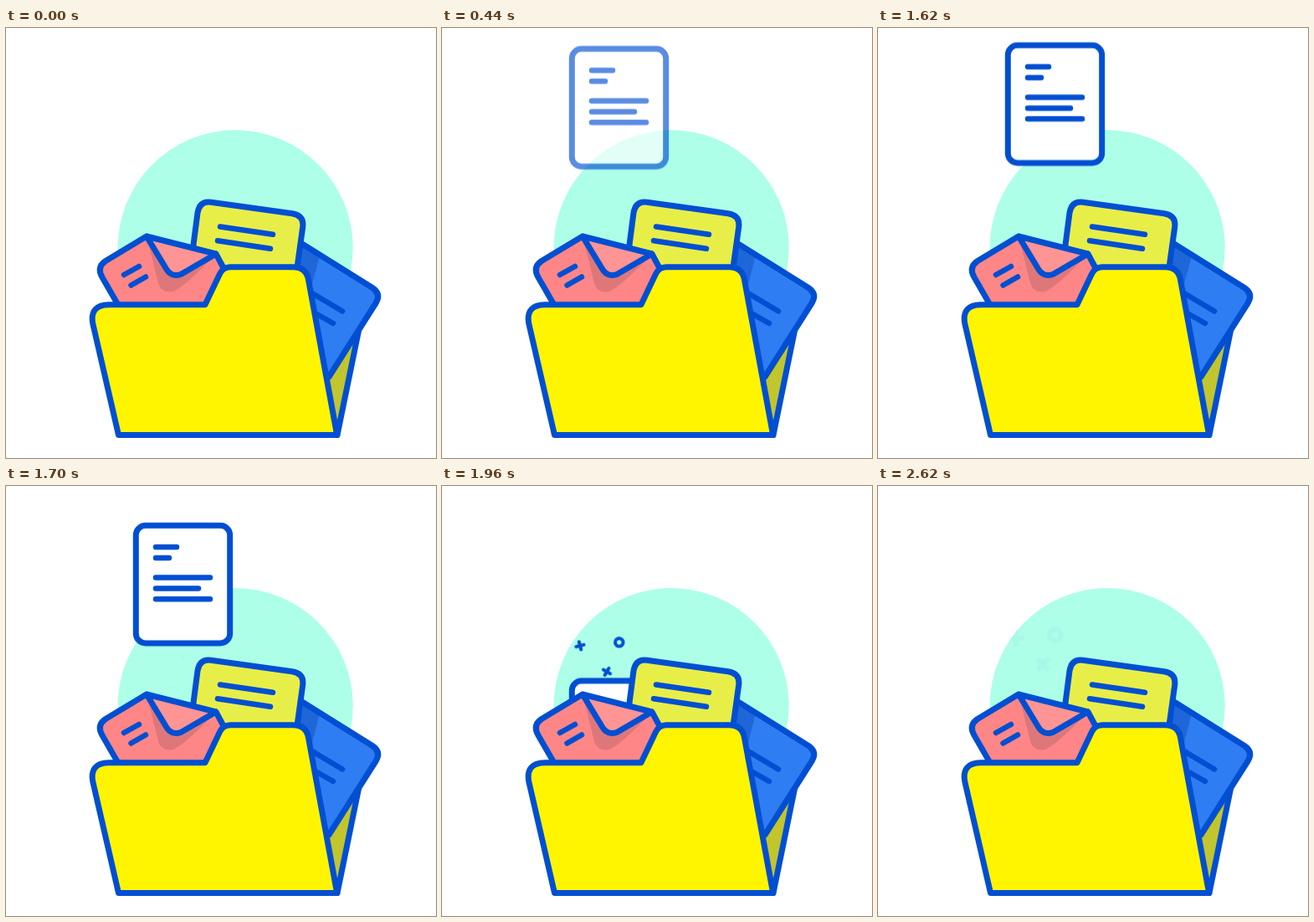
An HTML page without scripts that plays this animation: 514x514 px, repeating every 4800 ms.

```html
<!DOCTYPE html>
<html lang="en">
<head>
<meta charset="utf-8">
<title>Filing a document</title>
<style>
  html, body { margin: 0; width: 100%; height: 100%; overflow: hidden; background: #fff; }
  svg { display: block; width: 100%; height: 100%; }

  .line { fill: none; }
  .ink { stroke: #004fd2; stroke-width: 7; stroke-linecap: round; stroke-linejoin: round; }
  .thin { stroke-width: 6.5; }

  .page, .sparks, .spark {
    animation: 4800ms infinite cubic-bezier(.333, 0, .667, 1);
  }
  .page { animation-name: file; }
  .sparks { animation-name: fade; }
  .spark { animation-name: pop; }

  /* appear 200-600 ms, drop 1600-2100 ms */
  @keyframes file {
    0%, 4.1667% { transform: translateY(16px); opacity: 0; }
    12.5%, 33.3333% { transform: none; opacity: 1; }
    43.75%, 100% { transform: translateY(263.4px); opacity: 1; }
  }
  /* burst 1650-2150 ms */
  @keyframes pop {
    0%, 34.375% { transform: translateY(28px) rotate(-45deg) scale(0); }
    44.7917%, 100% { transform: translateY(0) rotate(0deg) scale(1); }
  }
  /* 2160-2620 ms, leaving a faint trace */
  @keyframes fade {
    0%, 45% { opacity: 1; }
    54.5833%, 100% { opacity: .035; }
  }
</style>
</head>
<body>
<svg viewBox="0 0 514 514">
  <defs>
    <path id="cross" d="M-7 0H7M0 -7V7"/>
  </defs>

  <circle cx="274.2" cy="262.5" r="140.5" fill="#adffe8"/>

  <g class="sparks ink line" style="stroke-width:6">
    <g transform="translate(165 182)"><g class="spark"><use href="#cross"/></g></g>
    <g transform="translate(211.8 178)"><g class="spark"><circle r="7"/></g></g>
    <g transform="translate(197 213)"><g class="spark"><use href="#cross" transform="rotate(45)"/></g></g>
  </g>

  <g class="page ink">
    <rect x="155.3" y="19.3" width="112.4" height="140.6" rx="11.5" fill="#fff"/>
    <path class="line thin" d="M179 45H204M179 58H195M179 81.5H244M179 94.5H230M179 107.3H244"/>
  </g>

  <!-- folder back -->
  <path class="ink" fill="#c2c52c" d="M370 362H421.5L396 486.5L370 400Z"/>

  <!-- blue card -->
  <g>
    <path fill="#2f7df2" d="M340 249L354 258L438 310.5Q449 318 442 329L386 417L340 400Z"/>
    <path fill="#1f66d8" d="M345 252L354 258L375 272L364 314L345 310Z"/>
    <path class="ink line" d="M354 258L438 310.5Q449 318 442 329L386 417"/>
    <path class="ink line thin" d="M360 313.5L402 338.5M368 340L391 353"/>
  </g>

  <!-- yellow card -->
  <g class="ink">
    <path fill="#e8ee48" d="M220 290L229 221Q231.5 206.5 245 208.3L342 221.7Q356.5 224 354.7 238L347.5 290Z"/>
    <path class="line thin" d="M256 237.5L319 246.7M253 254.3L316 263.7"/>
  </g>

  <!-- envelope -->
  <g>
    <path fill="#ff8686" d="M134 331L115 298Q108 286 119 278.5L168 249L251 270L259 285L238 331Z"/>
    <path fill="#de777a" d="M168 249L182 305Q186 318 200 315Q214 309 251 270Z"/>
    <path fill="#ff9494" d="M168 249L191 287Q197 298.500 209 294.500L251 270Z"/>
    <path class="ink line" d="M134 331L115 298Q108 286 119 278.5L168 249L251 270L259 285M168 249L191 287Q197 298.5 209 294.5L251 270"/>
    <path class="ink line thin" d="M141 295L159 285M149.500 307.500L167 297.500"/>
  </g>

  <!-- folder front -->
  <path class="ink" fill="#fff500" d="M134.5 486.5L103.7 353Q100 331 123 330.7H238L255.5 294Q259.500 285.700 268 285.700H343Q359 285.700 361.500 301L395.700 486.500Z"/>
</svg>
</body>
</html>
```
